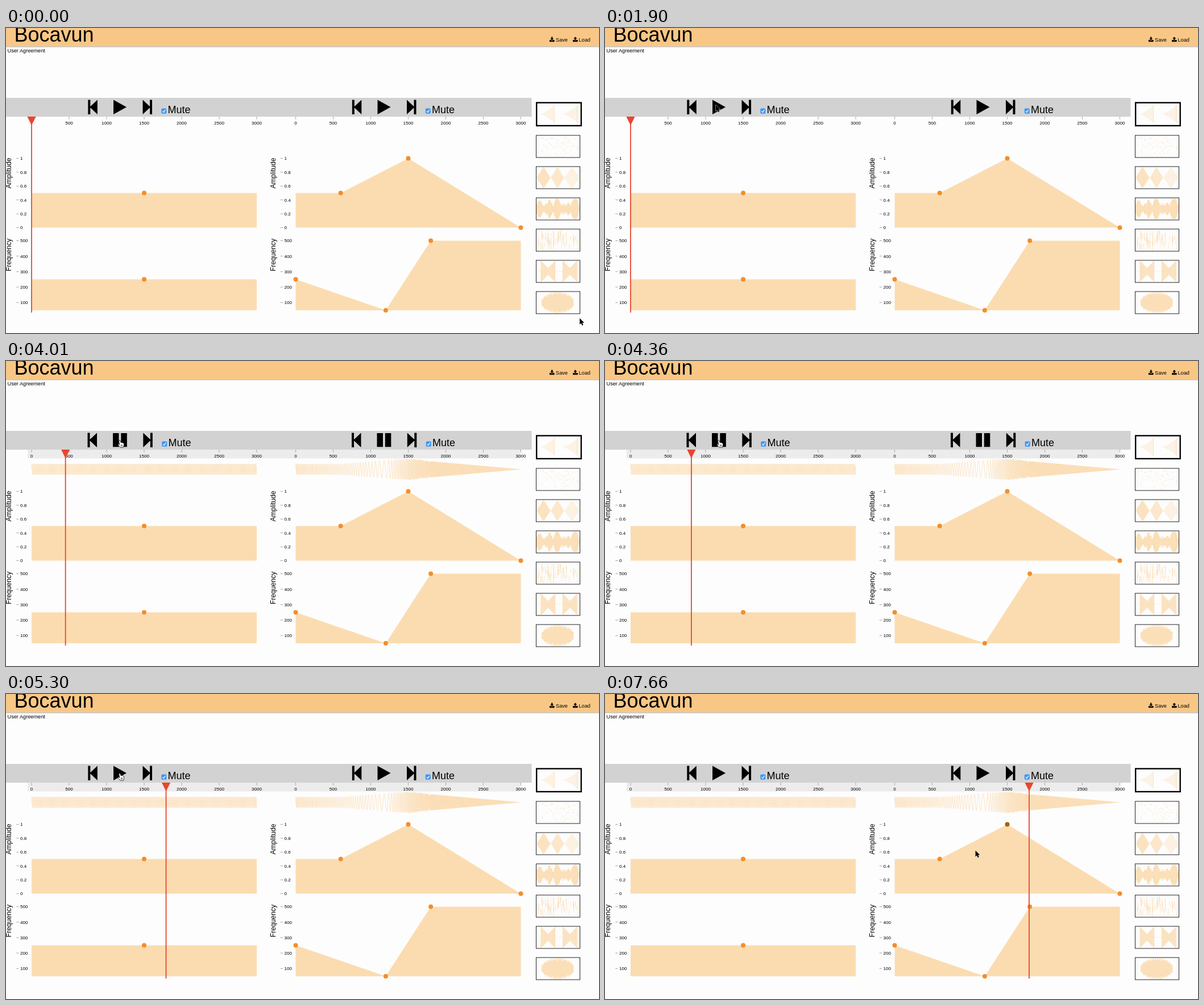
Animation of 1043x537 px, one loop 8 s. Source, as an HTML page:

```html
<!DOCTYPE html>
<html lang="en">
<head>
<meta charset="utf-8">
<title>Vibration editor</title>
<style>
  html, body { margin: 0; width: 100%; height: 100%; overflow: hidden; background: #fdfdfd; }
  svg { display: block; width: 100vw; height: 100vh; font-family: "Liberation Sans", Arial, sans-serif; }
</style>
</head>
<body>
<svg id="stage" viewBox="0 0 1043 537" preserveAspectRatio="none"></svg>
<script>
const LOOP = 8000;
const PLAY = 3600, PAUSE = 5300, SWITCH = 6820;
const PANEL = 464.5;
const PEACH = '#fbdcb1', PALE = '#fce8cd', DOT = '#f28e2c', DARK_DOT = '#a5600f', RED = '#e9452f';
const stage = document.getElementById('stage');

function add(tag, attrs, parent = stage, text) {
  const el = document.createElementNS('http://www.w3.org/2000/svg', tag);
  for (const k in attrs) el.setAttribute(k, attrs[k]);
  if (text !== undefined) el.textContent = text;
  parent.appendChild(el);
  return el;
}
const rect = (x, y, width, height, fill, parent, more) =>
  add('rect', { x, y, width, height, fill, ...more }, parent);
const label = (x, y, size, text, parent, more) =>
  add('text', { x, y, 'font-size': size, ...more }, parent, text);
const path = (d, parent, more) => add('path', { d, ...more }, parent);
const group = (parent, more) => add('g', more || {}, parent);
const show = (el, on) => el.setAttribute('visibility', on ? 'visible' : 'hidden');

function rng(seed) {
  return () => (seed = (seed * 16807) % 2147483647) / 2147483647;
}

// Piecewise linear lookup: rows of [time, ...values]
function track(rows, t) {
  if (t <= rows[0][0]) return rows[0].slice(1);
  for (let i = 1; i < rows.length; i++) {
    const a = rows[i - 1], b = rows[i];
    if (t <= b[0]) {
      const k = (t - a[0]) / (b[0] - a[0]);
      return a.slice(1).map((v, j) => v + (b[j + 1] - v) * k);
    }
  }
  return rows[rows.length - 1].slice(1);
}

function drawHeader() {
  rect(0, 0, 1043, 32, '#f9c785');
  rect(0, 32, 1043, 2, '#cfcac4');
  label(14.5, 24, 36, 'Bocavun');
  label(2.5, 43, 9.2, 'User Agreement');
  label(967, 24, 9.2, 'Save');
  label(1007.5, 24, 9.2, 'Load');
  const tray = 'M0,5.5 H2.6 L4.3,7 L6,5.5 H8.6 V8.6 H0 Z';
  path(tray + ' M3.2,0 H5.4 V2.8 H7.4 L4.3,6 L1.2,2.8 H3.2 Z', stage, { transform: 'translate(956 15.6)' });
  path(tray + ' M3.2,6 H5.4 V3.2 H7.4 L4.3,0 L1.2,3.2 H3.2 Z', stage, { transform: 'translate(997 15.6)' });
}

// Sine whose amplitude and frequency follow the two envelopes
function wavePath(amp, freq) {
  let d = '', phase = 0;
  for (let x = 45; x <= 441; x += 0.24) {
    const ms = (x - 45) / 396 * 3000;
    const y = 190.7 - 19 * track(amp, ms)[0] * Math.sin(phase);
    d += (d ? 'L' : 'M') + x.toFixed(2) + ',' + y.toFixed(1);
    phase += 0.24 * 2 * Math.PI * track(freq, ms)[0] / 480;
  }
  return d;
}

const msToX = ms => 45 + ms * 0.132;
const ampToY = v => 351.5 - v * 122;
const freqToY = v => 510.5 - v * 0.272;

function drawArea(g, rows, toY, base, knobs) {
  const pts = rows.map(([ms, v]) => [msToX(ms), toY(v)]);
  path(`M45,${base} L${pts.join(' L')} L441,${base} Z`, g, { fill: PEACH });
  return knobs.map(i => add('circle', { cx: pts[i][0], cy: pts[i][1], r: 4, fill: DOT }, g));
}

function drawPanel(dx, amp, freq, ampKnobs, freqKnobs) {
  const g = group(stage, { transform: `translate(${dx} 0)` });
  const paused = group(g), playing = group(g);
  const prev = 'M144.3,126.5 h4 v11.8 L160.8,126.5 V152 L148.3,140.2 V152 h-4 Z';
  const next = 'M257,126.5 h-4 v11.8 L240.5,126.5 V152 L253,140.2 V152 h4 Z';
  path(prev + next + 'M189,126.5 L212,139.2 L189,152 Z', paused);
  path(prev, playing, { transform: 'translate(-.8 0)' });
  path(next, playing, { transform: 'translate(.8 0)' });
  path('M188,127 h10.5 v24.3 h-10.5 Z M202.3,127 h10.5 v24.3 h-10.5 Z', playing);

  const mute = group(g);
  rect(273.3, 141.5, 9, 9.2, '#3b96f7', mute, { rx: 2 });
  path('M275.5,146.3 L277.3,148.4 L280.3,143.8', mute, { fill: 'none', stroke: '#fff', 'stroke-width': 1.2 });
  label(284.6, 150, 18, 'Mute', mute);

  const wave = path(wavePath(amp, freq), g, { fill: 'none', stroke: '#fad9aa', 'stroke-width': 0.65 });

  let zero;
  for (let ms = 0; ms <= 3000; ms += 500) {
    const x = msToX(ms);
    rect(x - 0.4, 156, 0.8, 5, '#999', g);
    const text = label(x, 169.8, 8, ms, g, { 'text-anchor': 'middle' });
    if (!ms) zero = text;
  }
  const sideTick = (y, text) => {
    rect(18.3, y - 0.4, 4, 0.8, '#888', g);
    label(25, y + 2.9, 8, text, g);
  };
  for (let i = 0; i <= 5; i++) sideTick(ampToY(i / 5), i / 5);
  for (let f = 100; f <= 500; f += 100) sideTick(freqToY(f), f);
  const side = (y, text) =>
    label(0, 0, 12.2, text, g, { transform: `translate(9.3 ${y}) rotate(-90)`, 'text-anchor': 'middle' });
  side(255.5, 'Amplitude');
  side(399.5, 'Frequency');

  const dots = drawArea(g, amp, ampToY, 351.5, ampKnobs);
  drawArea(g, freq, freqToY, 497, freqKnobs);
  return { paused, playing, mute, wave, zero, dots };
}

// Thumbnail content: vertical hairlines whose reach comes from a rule
function hatch(g, from, to, step, reach, width = 0.8) {
  let d = '';
  for (let x = from; x <= to; x += step) {
    const h = reach(x);
    d += `M${x.toFixed(1)},${(19.5 - h).toFixed(1)}V${(19.5 + h).toFixed(1)}`;
  }
  path(d, g, { stroke: '#fbdfb8', 'stroke-width': width, fill: 'none' });
}

function drawThumbs() {
  const rand = rng(77);
  const thumbs = [...Array(7)].map((_, i) => {
    const y = i ? 134 + 55 * i : 132;
    return group(stage, { transform: `translate(932.5 ${y})` });
  });
  const [cones, specks, diamonds, bursts, strokes, bows, blob] = thumbs;

  for (const [a, b] of [[8, 33], [47, 74]])
    hatch(cones, a, b, 2.6, x => 16 * ((x - a) / (b - a)) ** 1.4 + 0.3, 0.9);
  rect(30.5, 5, 2, 29, PALE, cones);
  rect(71.5, 5, 2, 29, PALE, cones);

  let d = '';
  for (let i = 0; i < 75; i++)
    d += `M${(2 + rand() * 73).toFixed(1)},${(3 + rand() * 33).toFixed(1)}l.8,${(1 + rand() * 2).toFixed(1)}`;
  path(d, specks, { stroke: '#fbdfb8', 'stroke-width': 0.8 });

  const diamond = (mid, half) => x => Math.max(0, 19 * (1 - Math.abs(x - mid) / half));
  hatch(diamonds, 1.5, 25, 0.8, diamond(13, 12), 1);
  hatch(diamonds, 27, 49, 1.5, diamond(37.5, 11.5), 1.1);
  hatch(diamonds, 51, 76, 2.6, diamond(63, 13.5), 1);

  hatch(bursts, 1, 76, 1, x => {
    const swell = Math.abs(Math.sin(x * 0.21) * Math.cos(x * 0.083 + 0.4));
    return 3 + 15.5 * Math.min(1, swell * 0.9 + rand() * 0.35);
  }, 1);

  d = '';
  for (let i = 0; i < 62; i++) {
    const y = 1 + rand() * 24, h = 5 + rand() * 12;
    d += `M${(2 + rand() * 73).toFixed(1)},${y.toFixed(1)}l${(rand() * 3 - 1.5).toFixed(1)},${h.toFixed(1)}`;
  }
  path(d, strokes, { stroke: '#fbdfb8', 'stroke-width': 0.8 });

  rect(2, 19.2, 74, 0.6, PALE, bows);
  for (const a of [8.5, 47])
    hatch(bows, a, a + 25, 1.3, x => 6 + 13 * Math.abs((x - a) / 12.5 - 1), 1.1);

  hatch(blob, 10, 66, 1.2, x => {
    const u = (x - 38) / 29;
    return Math.max(1, 19 * Math.sqrt(Math.max(0, 1 - u * u)) * (0.72 + 0.28 * Math.abs(Math.sin(x * 0.75))));
  }, 1.2);

  thumbs.forEach((g, i) => i
    ? rect(0, 0, 77, 39, 'none', g, { y: 0, stroke: '#222', 'stroke-width': 1 })
    : rect(0.7, -0.5, 78.5, 40.5, 'none', g, { stroke: '#000', 'stroke-width': 2.4 }));
}

drawHeader();
rect(0, 123, 924.5, 33.2, '#d2d2d2');
const strip = rect(38, 156, 867, 15.6, '#ececec');
const left = drawPanel(0, [[0, 0.5], [1500, 0.5], [3000, 0.5]],
  [[0, 250], [1500, 250], [3000, 250]], [1], [1]);
const right = drawPanel(PANEL, [[0, 0.5], [600, 0.5], [1500, 1], [3000, 0]],
  [[0, 250], [1200, 50], [1800, 500], [3000, 500]], [1, 2, 3], [0, 1, 2]);
drawThumbs();

const head = group(stage);
rect(-0.9, 157, 1.8, 344, RED, head);
path('M-7.6,156 H7.6 L0,171.2 Z', head, { fill: RED });

const outline = { stroke: '#fff', 'stroke-width': 1, 'stroke-linejoin': 'round', 'paint-order': 'stroke' };
const arrow = path('M0,0 V11 L2.6,8.7 L4.3,12.7 L6.3,11.8 L4.6,8 H8 Z', stage, outline);
const hand = path('M3,1 Q4.2,0 5,1.2 L6,4.6 Q7,3.9 7.9,4.8 Q9,4.2 9.7,5.2 Q11,4.9 11.3,6.2 ' +
  'L11.5,9.5 L10.4,13 H5 L1,8.6 Q.4,7.2 2,7.2 L3.8,8.4 L2.6,2 Z M6.6,8.3 v2.8 M8.4,8.3 v2.8', stage,
  { fill: '#fff', stroke: '#000', 'stroke-width': 0.8, 'stroke-linejoin': 'round' });

const headTrack = [[PLAY, 49.5], [4360, 152], [4830, 215], [5180, 265], [PAUSE, 281.5]];
const pointer = [
  [260, 1009, 511], [500, 749, 298], [670, 749, 298], [850, 690, 334], [1490, 332, 156],
  [1900, 195, 135.5], [2640, 195, 135.5], [2820, 193, 145], [3000, 196, 139],
  [5600, 196, 139], [5850, 450, 343], [6060, 641, 270], [6170, 641, 270], [6230, 696, 238],
  [6360, 727, 220], [6520, 706, 228], [6760, 706, 228], [6960, 706, 272],
  [7080, 706, 272], [7250, 692, 257], [7430, 692, 257], [7660, 651.5, 275.5]
];

function playheadX(t) {
  if (t < PLAY) return 45;
  if (t >= SWITCH) return 281.5 + PANEL;
  if (t >= PAUSE) return 281.5;
  const tick = 58.4;
  return track(headTrack, PLAY + Math.floor((t - PLAY) / tick) * tick)[0];
}

function render(t) {
  const started = t >= PLAY, playing = started && t < PAUSE;
  show(strip, started);
  show(left.zero, started);
  for (const p of [left, right]) {
    show(p.wave, started);
    show(p.playing, playing);
    show(p.paused, !playing);
    p.mute.setAttribute('transform', `translate(${playing ? 0.9 : 0} 0)`);
  }
  right.dots[1].setAttribute('fill', t >= SWITCH ? DARK_DOT : DOT);
  head.setAttribute('transform', `translate(${playheadX(t)} 0)`);

  const [x, y] = track(pointer, t);
  const pointing = t >= 2880 && t < 5660;
  show(hand, pointing);
  show(arrow, !pointing);
  (pointing ? hand : arrow).setAttribute('transform', `translate(${x} ${y})`);
}

const start = performance.now();
function frame() {
  render((performance.now() - start) % LOOP);
  requestAnimationFrame(frame);
}
render(0);
requestAnimationFrame(frame);
</script>
</body>
</html>
```
